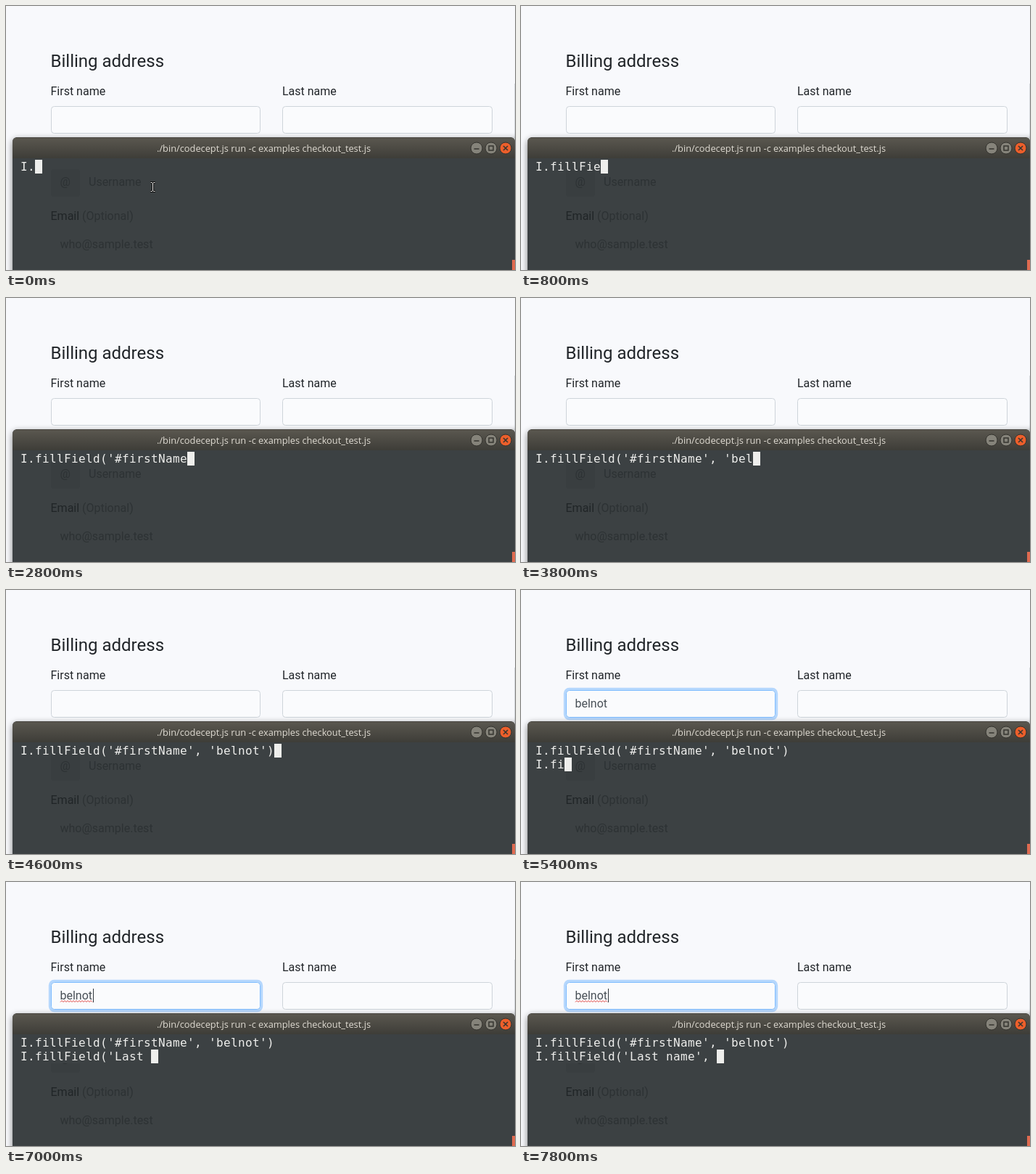
An HTML page for the animation above (8000 ms loop, 702 px wide and 364 px high).

```html
<!DOCTYPE html>
<html lang="en">
<head>
<meta charset="utf-8">
<title>Form filling from a terminal</title>
<style>
  html, body { margin: 0; width: 100%; height: 100%; overflow: hidden; background: #f8f9fc; }
  svg { display: block; width: 702px; height: 364px; }
  text { font: 16px Roboto, sans-serif; fill: #212529; white-space: pre; }
  .heading { font-size: 24px; }
  .input { fill: #fafbfd; stroke: #ced4da; }
  .value { fill: #495057; }
  .title { font: 12.8px "Open Sans", sans-serif; fill: #dfdbd2; }
  .ghost text { fill: #2d3234; }
  .ghost .strong { fill: #202527; }
  .line { font: 16px "DejaVu Sans Mono", monospace; fill: #eeeeec; }
  .button { stroke: #34332e; }
  .icon { fill: none; stroke: #35342f; stroke-width: 1.5; }
</style>
</head>
<body>
<svg viewBox="0 0 702 364">
  <defs>
    <linearGradient id="bar" x2="0" y2="1">
      <stop stop-color="#5b5850"/><stop offset="1" stop-color="#3e3d38"/>
    </linearGradient>
    <filter id="blur" x="-10%" y="-20%" width="120%" height="140%"><feGaussianBlur stdDeviation="5"/></filter>
  </defs>

  <text class="heading" x="61.5" y="84">Billing address</text>
  <text x="61.5" y="123">First name</text>
  <text x="381" y="123">Last name</text>
  <path d="M701.5 107V182" stroke="#d9dce0"/>
  <rect class="input" x="381.5" y="138.5" width="289" height="37" rx="4"/>
  <rect class="input" x="62.5" y="138.5" width="288" height="37" rx="4"/>
  <g id="focus">
    <rect x="60.4" y="136.4" width="292.2" height="41.2" rx="6" fill="none" stroke="#007bff" stroke-opacity=".27" stroke-width="3.2"/>
    <rect x="62.5" y="138.5" width="288" height="37" rx="4" fill="#fafbfd" stroke="#80bdff"/>
    <text class="value" x="74.5" y="162">belnot</text>
  </g>
  <path id="squiggle" fill="none" stroke="#e0403c"/>
  <path id="caret" d="M120.5 147V166" stroke="#30363c"/>

  <rect x="9" y="184" width="710" height="200" rx="6" opacity=".5" filter="url(#blur)"/>
  <path d="M9 364V188q0-7 7-7H695q7 0 7 7V364z" fill="#3c4143"/>
  <path d="M9 210V188q0-7 7-7H695q7 0 7 7V210z" fill="url(#bar)"/>
  <path d="M14 181.5H697" stroke="#47453f"/>
  <text class="title" x="208" y="201">./bin/codecept.js run -c examples checkout_test.js</text>
  <g class="button">
    <circle cx="649" cy="196" r="8" fill="#85837a"/>
    <circle cx="669" cy="196" r="8" fill="#85837a"/>
    <circle cx="689" cy="196" r="8" fill="#ec5f2b"/>
  </g>
  <path class="icon" d="M645.5 197H652.5M666 193H672V199H666zM686 193L692 199M692 193L686 199"/>

  <g class="ghost">
    <rect x="62" y="225" width="40" height="38" rx="4" fill="#393e40"/>
    <text x="74.5" y="248">@</text>
    <text x="114" y="248">Username</text>
    <text class="strong" x="61.5" y="295">Email</text>
    <text x="105" y="295">(Optional)</text>
    <text x="74.5" y="334">who@sample.test</text>
  </g>
  <rect x="698" y="350" width="4" height="14" fill="#df6a50"/>

  <rect id="cover" x="20" y="231" height="19" fill="#3c4143"/>
  <text class="line" id="row0" y="227"></text>
  <text class="line" id="row1" y="246"></text>
  <rect id="block" width="10" height="19" fill="#eeeeec"/>
  <g id="pointer" fill="none">
    <path d="M199 243.5h2.5l1 1 1-1H206M202.5 244V255M199 255.5h2.5l1-1 1 1H206" stroke="#111" stroke-width="3"/>
    <path d="M199.5 243.5h2l1 1 1-1h2M202.5 244V255M199.5 255.5h2l1-1 1 1h2" stroke="#eee"/>
  </g>
</svg>
<script>
const $ = id => document.getElementById(id);
const LOOP = 8000, TICK = 200, ENTER = 24;
const lines = ["I.fillField('#firstName', 'belnot')", "I.fillField('Last name', "];

// Cursor column at each tick; the second line starts at ENTER
const columns = [
  2, 3, 5, 7, 9, 11, 13, 14, 14, 17, 17, 19, 19, 21, 23, 23, 25, 27, 28, 30, 31, 33, 34, 35,
  -1, -1, 2, 4, 6, 8, 11, 13, 13, 15, 17, 18, 20, 22, 23, 25
];

const cellX = col => 20 + 10 * col;
const show = (id, on) => $(id).style.display = on ? '' : 'none';

function type(row, count) {
  const chars = [...lines[row].slice(0, Math.max(0, count))];
  $('row' + row).setAttribute('x', chars.map((_, i) => cellX(i)).join(' ') || 20);
  $('row' + row).textContent = chars.join('');
}

function draw(t) {
  const tick = Math.floor(t / TICK), col = columns[tick], second = tick >= ENTER;
  type(0, second ? lines[0].length : col);
  type(1, second ? col : 0);
  $('cover').setAttribute('width', second ? Math.max(0, col * 10) : 0);
  $('block').setAttribute('x', cellX(col));
  $('block').setAttribute('y', second ? 231 : 212);
  show('pointer', t < 200);
  show('focus', t >= 5000);
  show('squiggle', t >= 5600);
  show('caret', t >= 5600 && t < 6600 || t >= 6800 && t < 7200 || t >= 7800);
}

$('squiggle').setAttribute('d', 'M75 165.5' + 'l2-2 2 2'.repeat(11));

function frame(now) {
  draw(now % LOOP);
  requestAnimationFrame(frame);
}
draw(0);
requestAnimationFrame(frame);
</script>
</body>
</html>
```
